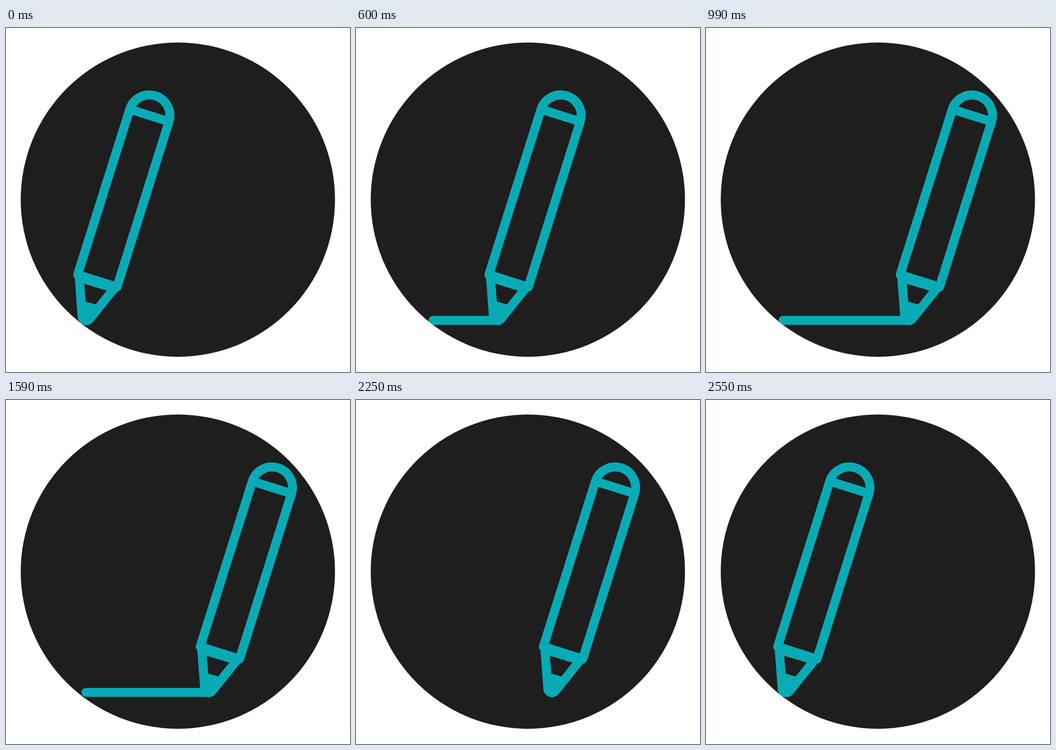
An HTML page that plays this animation: 748x748 px, repeating every 2580 ms.

```html
<!DOCTYPE html>
<html lang="en">
<head>
<meta charset="utf-8">
<title>Pencil</title>
<style>
  html, body { margin: 0; height: 100%; overflow: hidden; background: #fff; }
  svg { display: block; width: 100%; height: 100%; }
</style>
</head>
<body>
<svg viewBox="0 0 748 748">
  <clipPath id="disc"><circle cx="373.7" cy="373.2" r="341.7"/></clipPath>
  <circle cx="373.7" cy="373.2" r="341.7" fill="#1e1e1e"/>
  <g fill="none" stroke="#08abb5" stroke-width="19.5" stroke-linecap="round" stroke-linejoin="round">
    <g clip-path="url(#disc)"><path id="line"/></g>
    <g id="pencil">
      <path d="M155.8 536.4 L269.1 176.8 A44.6 44.6 0 0 1 354.3 203.5 L241.4 563.2 Z M269.1 176.8 L354.3 203.5"/>
      <path fill="#08abb5" fill-rule="evenodd" stroke="none"
        d="M149.5 543 L155.8 628 A18.8 18.8 0 0 0 189.4 638.8 L243 572 Z M170 556 L219 571 L195 601 L173 595 Z"/>
    </g>
  </g>
</svg>
<script>
const LOOP = 2580, STEP = 30, TRAVEL = 266.5, LEFT = 167.5;
const line = document.getElementById('line');
const pencil = document.getElementById('pencil');

// Cubic easing with flat ends; a and b are the handles' time positions.
function ease(t, start, end, a, b) {
  const x = (t - start) / (end - start);
  if (x <= 0) return 0;
  if (x >= 1) return 1;
  let lo = 0, hi = 1;
  for (let i = 0; i < 30; i++) {
    const u = (lo + hi) / 2, v = 1 - u;
    if (3 * u * v * v * a + 3 * u * u * v * b + u * u * u < x) lo = u; else hi = u;
  }
  return lo * lo * (3 - 2 * lo);
}

function draw(now) {
  const t = Math.floor(now % LOOP / STEP) * STEP;
  const go = ease(t, 210, 990, 1 / 3, 2 / 3);
  const erase = ease(t, 1560, 1890, 1 / 3, 2 / 3);
  const back = ease(t, 2220, 2550, 1 / 6, 2 / 3);

  pencil.setAttribute('transform', `translate(${TRAVEL * (go - back)} 0)`);
  line.setAttribute('d', go > erase
    ? `M${LEFT + TRAVEL * erase} 635.8 H${LEFT + TRAVEL * go}` : '');
}

const begin = performance.now();
function tick() {
  draw(performance.now() - begin);
  requestAnimationFrame(tick);
}
tick();
</script>
</body>
</html>
```
